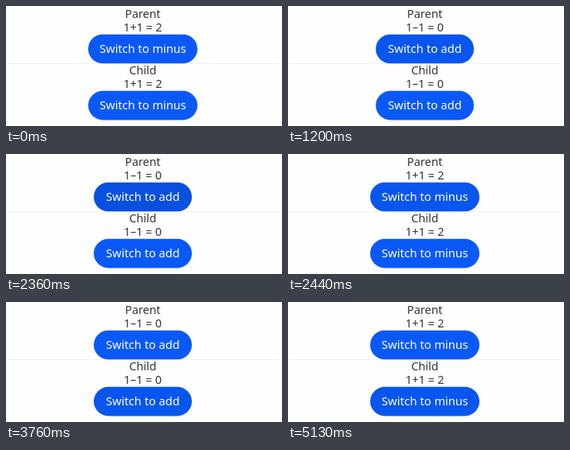
An HTML page for the animation above (6370 ms loop, 346 px wide and 151 px high).

```html
<!DOCTYPE html>
<html lang="en">
<head>
<meta charset="utf-8">
<title>Parent and child switch</title>
<style>
  html, body { margin: 0; width: 100%; height: 100%; overflow: hidden; background: #fefefe; }
  svg { display: block; width: 346px; height: 151px; }
  text { font: 14.3px "Noto Sans", "Open Sans", sans-serif; text-anchor: middle; fill: #333; }
  .label { font-size: 14.6px; fill: #fff; }
</style>
</head>
<body>
<svg viewBox="0 0 346 151">
  <rect width="346" height="151" fill="#fefefe"/>
  <rect y="72" width="346" height="1" fill="#f1f1f1"/>
  <g id="parent">
    <text x="171.5" y="15">Parent</text>
    <text class="sum" x="171.5" y="32"></text>
    <rect class="pill" y="35.7" height="36.6" rx="18.3"/>
    <text class="label" x="171.5" y="59"></text>
  </g>
  <g id="child" transform="translate(0 71.1)">
    <text x="171.5" y="15">Child</text>
    <text class="sum" x="171.5" y="32"></text>
    <rect class="pill" y="35.7" height="36.6" rx="18.3"/>
    <text class="label" x="171.5" y="59"></text>
  </g>
</svg>
<script>
const LOOP = 6370;
const IDLE = '#0a59f7', PRESSED = '#0850de', EASING = '#0856ee';

const ADD = { sum: '1+1 = 2', label: 'Switch to minus', width: 137 };
const MINUS = { sum: '1\u20131 = 0', label: 'Switch to add', width: 123 };

// start time, mode, parent button colour, child button colour
const steps = [
  [0, ADD, IDLE, IDLE],
  [1160, ADD, PRESSED, IDLE],
  [1200, MINUS, EASING, IDLE],
  [1240, MINUS, IDLE, IDLE],
  [2360, MINUS, PRESSED, IDLE],
  [2440, ADD, EASING, IDLE],
  [3720, ADD, IDLE, PRESSED],
  [3760, MINUS, IDLE, EASING],
  [5090, MINUS, IDLE, PRESSED],
  [5130, ADD, IDLE, EASING]
];

const panels = ['parent', 'child'].map(id => {
  const find = name => document.querySelector(`#${id} .${name}`);
  return { sum: find('sum'), pill: find('pill'), label: find('label') };
});

let shown;

function render(time) {
  const step = steps.findLast(([start]) => start <= time);
  if (step === shown) return;
  shown = step;
  const [, mode, ...fills] = step;
  panels.forEach(({ sum, pill, label }, i) => {
    sum.textContent = mode.sum;
    label.textContent = mode.label;
    pill.setAttribute('x', 171.5 - mode.width / 2);
    pill.setAttribute('width', mode.width);
    pill.setAttribute('fill', fills[i]);
  });
}

const origin = performance.now();

function tick() {
  render((performance.now() - origin) % LOOP);
  requestAnimationFrame(tick);
}
tick();
</script>
</body>
</html>
```
